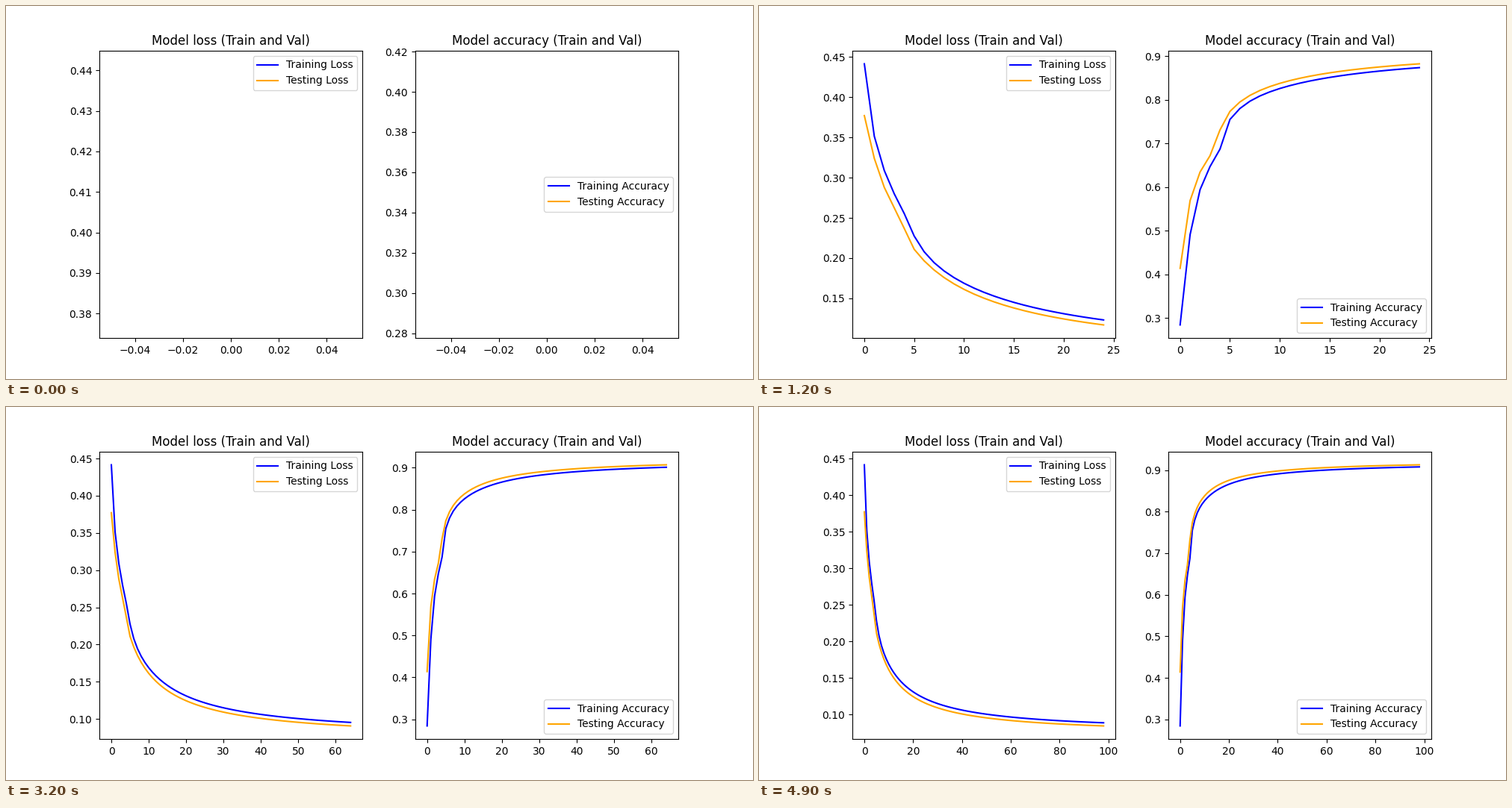
A matplotlib script that plays this animation: 1000 by 500 pixels, repeating every 5000 ms.

```python
import numpy as np
import matplotlib.pyplot as plt
from matplotlib.animation import FuncAnimation

FRAMES, INTERVAL = 50, 100
EPOCHS = np.arange(2 * FRAMES - 1)


def learning_curve(start, limit, scale, shift, decay=0.42):
    """Follow the `start` epochs, then ease onto limit + scale / (x + shift)."""
    y = limit + scale / (EPOCHS + shift)
    last = len(start) - 1
    y[last:] += (start[-1] - y[last]) * decay ** (EPOCHS[last:] - last)
    y[:last] = start[:-1]
    return y


LOSS = (
    learning_curve([.4416, .3515, .309, .28, .2555, .2275], .0751, 1.384, 4.8),
    learning_curve([.3772, .324, .288, .2625, .237, .211], .0718, 1.278, 4.3),
)
ACCURACY = (
    learning_curve([.2842, .491, .594, .647, .687, .755], .9203, -1.29, 3.7),
    learning_curve([.4139, .569, .6345, .672, .731, .7735], .9236, -1.106, 2.9),
)

fig, axes = plt.subplots(1, 2, figsize=(10, 5), dpi=100)
lines = []


def add_panel(ax, name, curves):
    ax.set_title(f"Model {name.lower()} (Train and Val)")
    for label, color, data in zip(("Training", "Testing"),
                                  ("blue", "orange"), curves):
        line, = ax.plot([], [], color=color, label=f"{label} {name}")
        lines.append((line, data))
    ax.legend(loc="best")


add_panel(axes[0], "Loss", LOSS)
add_panel(axes[1], "Accuracy", ACCURACY)


def update(frame):
    n = 2 * frame + 1  # two epochs per step
    for line, data in lines:
        line.set_data(EPOCHS[:n], data[:n])
    for ax in axes:
        ax.relim()
        ax.autoscale_view()
    return [line for line, _ in lines]


anim = FuncAnimation(fig, update, frames=FRAMES, interval=INTERVAL,
                     repeat=True, repeat_delay=0)
plt.show()
```
